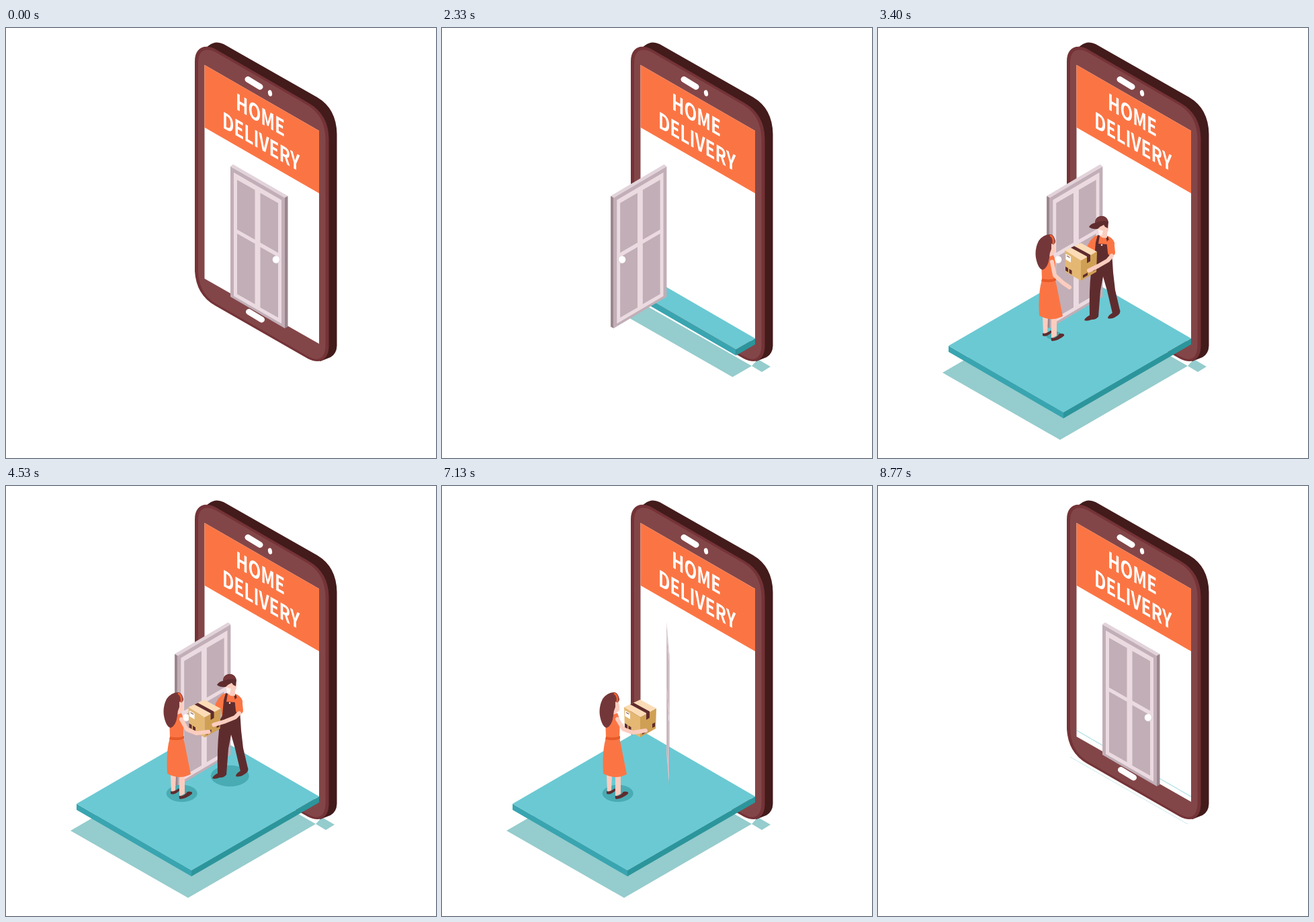
These frames come from a looping animation (640x640 px, 9.26 s). An HTML page:

```html
<!DOCTYPE html>
<html lang="en">
<head>
<meta charset="utf-8">
<title>Home delivery</title>
<style>
  html, body { margin: 0; height: 100%; overflow: hidden; background: #fff; }
  svg { display: block; width: 100vw; height: 100vh; }
  text { font: bold 33px "Noto Sans CJK JP", "Noto Sans CJK SC", "Noto Sans", sans-serif; text-anchor: middle; fill: #fff; }
  .limb { fill: none; stroke-linecap: round; stroke-linejoin: round; }
  .skin { fill: #fbcdbf; }
  .limb.skin { fill: none; stroke: #fbcdbf; stroke-width: 6; }
  .orange { fill: #fb7544; }
  .limb.orange { fill: none; stroke: #fb7544; stroke-width: 11; }
  .brown { fill: #5f2c2e; }
  .mauve { fill: #c1aeb7; }
  .pale { fill: #ebdbe1; }
  .shade { fill: #49abb3; }
  .cast { fill: #95cccd; }
</style>
</head>
<body>
<svg viewBox="0 0 640 640">
  <path id="cast" class="cast"/>
  <path id="corner" class="cast" d="M461 503l15 9 13-8-19-11z"/>

  <g id="phone">
    <path fill="#431b1b" d="M288 36L302 26Q312 18 324 24L463 103Q492 120 492.500 158V473Q492 485 483 490L468 496 300 380z"/>
    <path fill="#743337" d="M281 50C281 30 294 23 311 31L451 112Q480 129 480.500 165V474C480 495 466 501 449 492L311 413Q283 397 281 362z"/>
    <path fill="#834648" d="M286 51C286 34 296 28 312 36L449 115Q475 131 475.500 165V473C475 492 465 497 450 489L312 410Q287 395 286 362z"/>
    <path fill="#fff" d="M295.500 55L466 153V470L295.500 373z"/>
    <path class="orange" d="M295.500 55L466 153V246L295.500 148z"/>
    <path class="limb" stroke="#fff" stroke-width="9" d="M360 76.500l18 11M361.500 422.500l19 11.500"/>
    <ellipse cx="393" cy="97" rx="3" ry="4.700" fill="#fff" transform="rotate(-12 393 97)"/>
    <text transform="matrix(.74 .424 0 1 378.500 141.500)">HOME</text>
    <text transform="matrix(.74 .424 0 1 379.500 181)">DELIVERY</text>
  </g>

  <path id="floorLeft" fill="#39a5b0"/>
  <path id="floorRight" fill="#2c959c"/>
  <path id="floorTop" fill="#6bc9d3"/>

  <g id="door">
    <path class="mauve" d="M334 206L415 252V447L334 400z"/>
    <path fill="#e2d3da" d="M334 206L338 203 419.500 250 415 253z"/>
    <path fill="#9b858d" d="M415 252.500L419.500 250V444.500L415 447z"/>
    <path class="pale" d="M339 215L410 256V440L339 399z"/>
    <path class="mauve" d="M344 226l26.500 15v74l-26.500-15zM378.500 245.500l26.500 15v74l-26.500-15zM344 306l26.500 15v90l-26.500-15zM378.500 326l26.500 15v90l-26.500-15z"/>
    <circle cx="402.500" cy="345" r="5.700" fill="#d9cdd2"/>
    <circle cx="402" cy="344.500" r="5.300" fill="#fff"/>
  </g>

  <ellipse id="womanShade" class="shade" rx="23" ry="12.700"/>
  <ellipse id="courierShade" class="shade" rx="28.500" ry="15.700"/>

  <g class="woman">
    <path class="skin" d="M245 428L253 430 252 453 246 457zM258 430L266 432 266 458 258 462z"/>
    <path class="brown" d="M245 454Q250 456 257 450Q260 453 255 456Q250 460 245 458zM258 461Q264 463 270 455Q278 454 277 458Q269 465 259 466Q257 465 258 461z"/>
    <path class="skin" d="M257 319L262 320Q265 327 264 334L260 337 261 343 252 342z"/>
    <path class="orange" d="M243 345L253 341 261 338Q266 347 264 374L275 429Q258 438 240 428Q238 394 244 375z"/>
    <path fill="#e65a29" d="M244 373Q256 376 265 372L265 376Q256 380 243 377z"/>
    <path fill="#743739" d="M257 307Q246 307 239 317Q233 329 235 342Q238 358 245 360Q253 357 255 342Q255 335 258 329L258 321Q264 323 264 317Q262 308 257 307z"/>
    <path class="limb" stroke="#f06232" stroke-width="2.800" d="M257 309Q262 312 261 321"/>
  </g>

  <g class="courier">
    <path id="backArm" class="limb skin"/>
    <path class="limb orange" d="M321 319L317 326"/>
    <path class="orange" d="M325 309L340 309Q350 312 352 320L347 350 322 345 317 318Q319 311 325 309z"/>
    <path class="brown" d="M317 350L322 342 324 319 327 308 330 309 328 321 342 322 339 311 342 310 347 325 349 348 350 364 353 390 360 420 349 425 341 391 335 370 331 391 328 430 315 429Q314 390 317 364z"/>
    <path class="brown" d="M316 427L328 429Q326 434 318 434Q311 437 307 435Q308 431 316 427zM349 422L360 419Q362 425 355 429Q348 434 342 432Q342 428 349 424z"/>
    <circle cx="333" cy="323" r="1.300" fill="#fbe0d6"/>
    <path class="skin" d="M327 294L342 292Q345 298 341 305L341 312Q334 314 330 309Q326 304 327 294z"/>
    <path fill="#fff2ee" d="M327 299L335 302 333 309 329 308z"/>
    <path class="brown" d="M323 290C323 277 341 276 343 289L342 298 338 296 336 293Q331 295 327 299Q319 300 314 296Q317 291 323 290z"/>
    <path fill="#743739" d="M323 290C324 278 340 277 342 288Q333 286 323 290z"/>
    <path class="limb orange" d="M346 320L347.500 334"/>
  </g>

  <g id="box">
    <path fill="#fbdcb7" d="M278 331L302 320 326 333 302 346z"/>
    <path fill="#e4b873" d="M278 331L302 346V376L279 363z"/>
    <path fill="#cfa054" d="M302 346L326 333 325 363 302 376z"/>
    <path class="brown" d="M287 327L292 324.500 316 337.500V347L311 350V340zM279 355l4 2.500v6l-4-2.500zM284.500 358.500l4 2.500v6l-4-2.500zM305 368l7-4v4l-7 4zM320 356l4-2v6l-4 2z"/>
    <path fill="#fff" d="M279.500 336L287 340.500V349L279.500 344.500z"/>
    <path stroke="#5f2c2e" d="M281 339l4.500 2.700"/>
  </g>

  <g class="courier"><path id="frontArm" class="limb skin"/></g>
  <g class="woman"><path id="womanArm" class="limb skin"/></g>
</svg>
<script>
const LOOP = 9260;
const $ = id => document.getElementById(id);
const set = (id, name, value) => $(id).setAttribute(name, value);

// Smoothstep progress between two times
const ease = (t, from, to) => {
  const u = Math.min(1, Math.max(0, (t - from) / (to - from)));
  return u * u * (3 - 2 * u);
};
// Growth that overshoots slightly and settles
const pop = (t, from, to) => {
  const u = Math.min(1, Math.max(0, (t - from) / (to - from))) - 1;
  return 1 + 2.35 * u ** 3 + 1.35 * u ** 2;
};
const scaleAt = (x, y, sx, sy = sx) => `translate(${x} ${y}) scale(${sx} ${sy}) translate(${-x} ${-y})`;
const poly = points => 'M' + points.map(p => p.join(' ')).join('L') + 'z';
const limb = (a, b, p) => 'M' + a.map((v, i) => v + (b[i] - v) * p).join(' ');

function drawFloor(p) {
  const dx = -190 * p, dy = 110 * p, h = 9 * Math.min(1, p * 10);
  const back = [295, 363], right = [466, 462];
  const left = [295 + dx, 363 + dy], front = [466 + dx, 462 + dy];
  const down = ([x, y]) => [x, y + h];
  set('floorTop', 'd', poly([back, right, front, left]));
  set('floorLeft', 'd', poly([left, front, down(front), down(left)]));
  set('floorRight', 'd', poly([front, right, down(right), down(front)]));
  set('cast', 'd', poly([[286, 403], [461, 503], [461 + dx, 503 + dy], [286 + dx, 403 + dy]]));
  set('corner', 'transform', scaleAt(465, 497, Math.min(1, p * 7)));
  for (const id of ['floorTop', 'floorLeft', 'floorRight', 'cast', 'corner'])
    set(id, 'visibility', p > .001 ? 'visible' : 'hidden');
}

function draw(t) {
  const open = ease(t, 1035, 2065) - ease(t, 6603, 7633);
  set('door', 'transform', scaleAt(334.2, 0, 1 - 1.975 * open, 1));
  drawFloor(ease(t, 2150, 2890) - ease(t, 8050, 8790));

  const woman = scaleAt(261, 459, pop(t, 2890, 3380) * (1 - ease(t, 7570, 8150)));
  const courier = scaleAt(323, 435, pop(t, 2890, 3390) * (1 - ease(t, 5270, 6010)));
  document.querySelectorAll('.woman').forEach(g => g.setAttribute('transform', woman));
  document.querySelectorAll('.courier').forEach(g => g.setAttribute('transform', courier));

  const womanShade = ease(t, 3200, 3600) - ease(t, 7570, 8150);
  const courierShade = ease(t, 3450, 3850) - ease(t, 5700, 6150);
  set('womanShade', 'transform', `translate(261.700 457.500) scale(${womanShade})`);
  set('courierShade', 'transform', `translate(333.200 431.500) scale(${courierShade})`);

  const given = ease(t, 3870, 4670);
  set('box', 'transform', `${t < 4700 ? courier : woman} translate(${-7 * given} ${-2 * given})`);
  set('womanArm', 'd', limb([259, 348, 263, 368, 275, 379, 285, 386], [261, 347, 270, 362, 284, 367, 303, 364], given));
  set('frontArm', 'd', limb([348, 339, 342, 346, 328, 354, 314, 361], [347, 338, 341, 344, 326, 350, 309, 355], given));
  set('backArm', 'd', limb([317, 327, 313, 336, 306, 342, 300, 346], [317, 328, 307, 340, 295, 345, 282, 347], given));
}

function tick() {
  draw(performance.now() % LOOP);
  requestAnimationFrame(tick);
}
tick();
</script>
</body>
</html>
```
